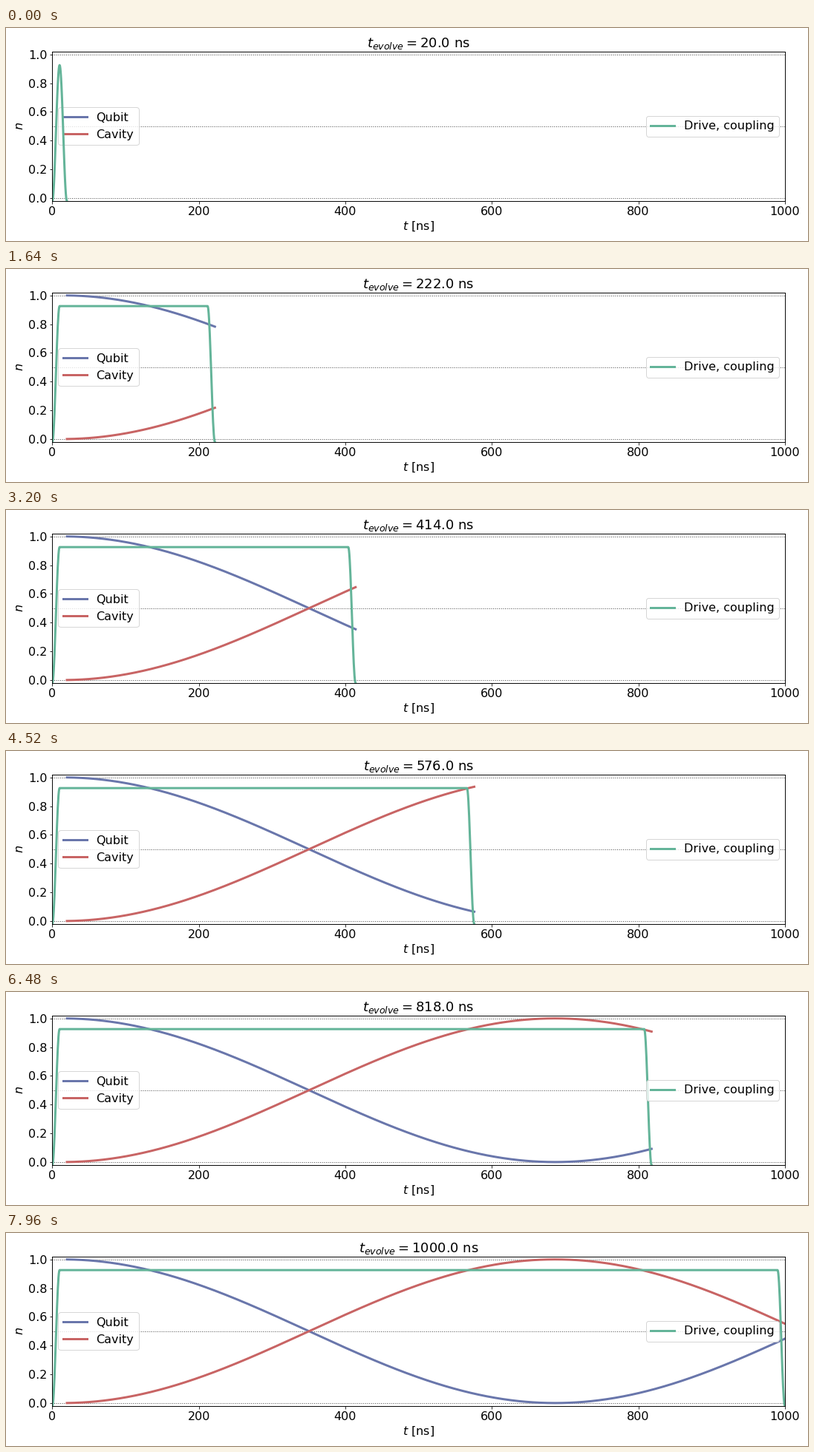
These frames come from a looping animation (1080x288 px, 8000 ms). A matplotlib script:

```python
import numpy as np
import matplotlib.pyplot as plt
from matplotlib.animation import FuncAnimation

WIDTH, HEIGHT, DPI = 1080, 288, 72
FRAMES, INTERVAL = 200, 40
RAMP = 10            # rise and fall time of the drive, ns
SWAP, DELAY = 672, 14.4   # full transfer time and effective start, ns
BLUE, RED, GREEN = "#6976ab", "#c86464", "#64b499"

plt.rcParams.update({
    "font.family": "DejaVu Sans",
    "font.size": 16,
    "axes.titlesize": 18,
})

times = np.round(np.linspace(20, 1000, FRAMES))


def cavity(t):
    return np.sin(np.pi / 2 * (t - DELAY) / SWAP) ** 2


def drive(t, end):
    edge = np.clip(np.minimum(t, end - t) / RAMP, 0, 1)
    return np.sin(np.pi / 2 * edge) ** 2


def heading(end):
    return rf"$t_{{evolve}} = {end:.1f}$ ns"


fig, ax = plt.subplots(figsize=(WIDTH / DPI, HEIGHT / DPI), dpi=DPI)
ax.set(xlim=(0, 1000), ylim=(-0.02, 1.02), xlabel="$t$ [ns]", ylabel="$n$")
ax.set_yticks(np.linspace(0, 1, 6))
for level in (0, 0.5, 1):
    ax.axhline(level, color="0.3", ls=":", lw=1)

drive_ax = ax.twinx()
drive_ax.set_ylim(0, 1.1)
drive_ax.set_yticks([])

qubit_line, = ax.plot([], [], color=BLUE, lw=3, label="Qubit")
cavity_line, = ax.plot([], [], color=RED, lw=3, label="Cavity")
drive_line, = drive_ax.plot([], [], color=GREEN, lw=3, label="Drive, coupling")
ax.legend(loc="center left")
drive_ax.legend(loc="center right")
title = ax.set_title(heading(times[0]))
fig.tight_layout(pad=1.08 * 10 / 16)   # margin of 10.8 points


def update(frame):
    end = times[frame]
    t = np.arange(20, end + 1) if frame else np.empty(0)
    qubit_line.set_data(t, 1 - cavity(t))
    cavity_line.set_data(t, cavity(t))
    pulse_t = np.linspace(0, end, int(2 * end) + 1)
    drive_line.set_data(pulse_t, drive(pulse_t, end))
    title.set_text(heading(end))
    return qubit_line, cavity_line, drive_line, title


anim = FuncAnimation(fig, update, frames=FRAMES, interval=INTERVAL, repeat=True)
plt.show()
```
